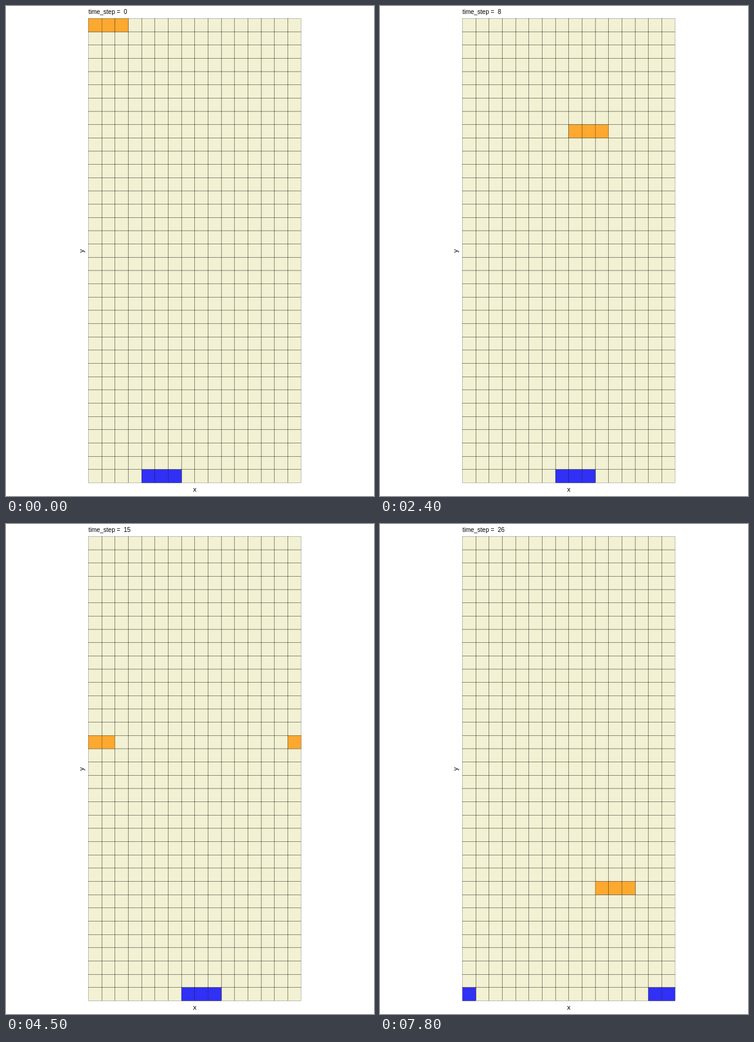
Write an HTML page with a canvas that moves like this. It is 600x800 px and loops after 8 s.

```html
<!DOCTYPE html>
<html lang="en">
<head>
<meta charset="utf-8">
<title>Grid steps</title>
<style>
  html, body { margin: 0; width: 600px; height: 800px; overflow: hidden; background: #fff; }
  canvas, svg { position: absolute; left: 0; top: 0; }
  text { font-family: "Liberation Sans", Arial, sans-serif; font-size: 11px; fill: #000; }
  #title { font-size: 10px; white-space: pre; }
</style>
</head>
<body>
<canvas id="grid" width="600" height="800"></canvas>
<svg width="600" height="800">
  <text id="title" x="134.4" y="13"></text>
  <text x="307.8" y="793" text-anchor="middle">x</text>
  <text transform="translate(126.5 400) rotate(-90)" text-anchor="middle">y</text>
</svg>
<script>
const COLS = 16, ROWS = 35, CELL = 21.66, LEFT = 134.5, TOP = 20.4;
const STEP = 300, LOOP = 8000;

// Steps at which the blue paddle moves one column to the right
const MOVES = [1, 2, 4, 18, 19, 20, 21, 22, 23, 24];
const PADDLE_START = 4;

const ctx = document.getElementById("grid").getContext("2d");
const title = document.getElementById("title");

function tile(col, row, fill) {
  const box = [LEFT + (col % COLS) * CELL, TOP + row * CELL, CELL, CELL];
  if (fill) {
    ctx.fillStyle = fill;
    ctx.fillRect(...box);
  }
  ctx.strokeRect(...box);
}

function block(col, row, fill) {
  for (let i = 0; i < 3; i++) tile(col + i, row, fill);
}

function draw(step) {
  ctx.clearRect(0, 0, 600, 800);
  ctx.lineWidth = 0.3;
  ctx.strokeStyle = "rgba(0, 0, 0, 0.8)";
  ctx.fillStyle = "#f2f1d3";
  ctx.fillRect(LEFT, TOP, COLS * CELL, ROWS * CELL);
  for (let r = 0; r < ROWS; r++)
    for (let c = 0; c < COLS; c++) tile(c, r);

  block(step, step, "#fda82f");
  block(PADDLE_START + MOVES.filter(s => s <= step).length, ROWS - 1, "#3030f6");
  title.textContent = "time_step =\u00a0\u00a0" + step;
}

let shown = -1;
const start = performance.now();
function tick(now) {
  const step = Math.floor((Math.max(0, now - start) % LOOP) / STEP);
  if (step !== shown) draw(shown = step);
  requestAnimationFrame(tick);
}
tick(start);
</script>
</body>
</html>
```
